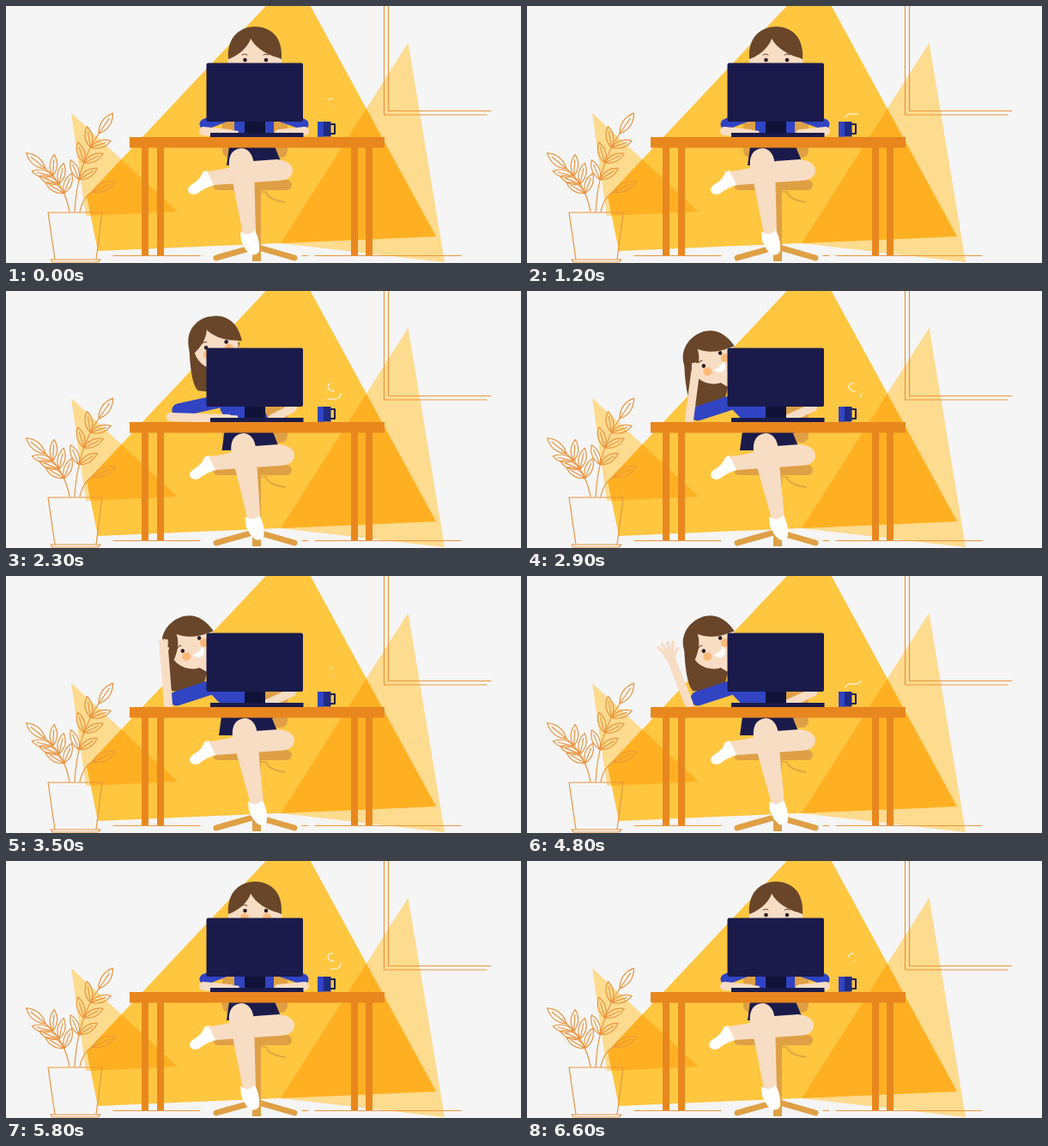
These frames come from a looping animation (600 by 300 pixels, 6.7 s). An HTML page:

```html
<!DOCTYPE html>
<html lang="en">
<head>
<meta charset="utf-8">
<title>Peek over the desk</title>
<style>
  html, body { margin: 0; width: 100%; height: 100%; overflow: hidden; background: #f5f5f6; }
  svg { display: block; width: 100vw; height: 100vh; }
  .line { fill: none; stroke: #e9963f; stroke-width: 1.2; stroke-linecap: round; stroke-linejoin: round; }
  .limb { fill: none; stroke-linecap: round; stroke-linejoin: round; }
  .skin { fill: #f8ddc5; }
  .skin.limb { fill: none; stroke: #f8ddc5; }
  .blue { fill: #3044c4; }
  .blue.limb { fill: none; stroke: #3044c4; }
  .hair { fill: #69462a; }
  .navy { fill: #1a1b4b; }
  .wood { fill: #e8871e; }
  .chair { fill: #dfa045; }
  .chair.limb { fill: none; stroke: #dfa045; }
  .steam { stroke: #fff2d5; stroke-width: 1.4; }
</style>
</head>
<body>
<svg viewBox="0 0 600 300">
  <defs>
    <path id="big" d="M328 -27L94 222L107 286L501 269L340 -27Z"/>
    <path id="small" d="M76 125L200 240L93 245Z"/>
    <path id="tall" d="M468.500 43L511 299L320 277Z"/>
    <clipPath id="inBig"><use href="#big"/></clipPath>
  </defs>

  <g id="backdrop">
    <g fill="#fddb8f"><use href="#small"/><use href="#tall"/></g>
    <use href="#big" fill="#ffc640"/>
    <g clip-path="url(#inBig)" fill="#ffb022"><use href="#small"/><use href="#tall"/></g>
    <path class="line" d="M440.500 0V127H560M445.500 0V122.500H565"/>
    <path class="line" d="M125 291.500H226M345 291.500H352M360 291.500H530"/>
  </g>

  <g id="plant" class="line">
    <path d="M49 241H112L105 296H57ZM52 296H110L107 299H54Z"/>
  </g>

  <g id="seat">
    <rect class="chair" x="252" y="118" width="76" height="59" rx="8"/>
    <path class="chair" d="M287 212H297V298H287Z"/>
    <path class="chair limb" stroke-width="7" d="M245 294L291 281L336 294"/>
    <path class="chair limb" stroke-width="1.500" d="M297 217H303Q305 226 325 229"/>
    <rect class="chair" x="241" y="203" width="92" height="12" rx="6"/>
  </g>

  <path id="backHair" class="hair"/>
  <path id="neck" class="skin limb" stroke-width="15"/>
  <path id="torso" class="blue"/>
  <path id="sleeveR" class="blue limb" stroke-width="13"/>
  <path id="armR" class="skin limb" stroke-width="10"/>

  <g id="legs">
    <path id="skirt" class="navy"/>
    <g id="foot">
      <path fill="#fff" d="M234 192L243 209Q231 212 223 219Q214 222 212 215Q212 210 220 206Q227 201 229 194Z"/>
      <path class="skin" d="M235 193Q262 190 288 181L316 179Q334 181 334 193Q332 204 315 204L242 209Z"/>
    </g>
    <path id="shin" class="skin"/>
    <path id="shoe" fill="#fff"/>
  </g>

  <g id="head">
    <circle id="earL" class="skin" cy="9" r="4.500"/>
    <circle id="earR" class="skin" cy="9" r="4.500"/>
    <ellipse class="skin" cy="4" rx="26" ry="28"/>
    <g id="face">
      <circle cx="-12" cy="16" r="5" fill="#fcb878"/>
      <circle cx="14" cy="16" r="5" fill="#fcb878"/>
      <circle cx="-11.500" cy="8" r="2.300" fill="#2b2024"/>
      <circle cx="13" cy="8" r="2.300" fill="#2b2024"/>
      <path class="limb" stroke="#69462a" stroke-width="1" d="M-15 2Q-12 0 -9 2M10 2Q13 0 16 2"/>
      <path fill="#fff" d="M-5 19Q3 22 10 18Q9 27 2 27Q-4 26 -5 19Z"/>
    </g>
    <path class="hair" d="M-31 7C-33 -20 -16 -31 0 -31C17 -31 33 -20 31 7L26 5C14 2 1 -6 -5 -17C-8 -7 -18 1 -26 5Z"/>
  </g>

  <path id="sleeveL" class="blue limb"/>
  <path id="armL" class="skin limb" stroke-width="10"/>
  <g id="hand">
    <ellipse class="skin" rx="7" ry="8"/>
    <path id="fingers" class="skin limb" stroke-width="3.800"/>
  </g>

  <g id="desk">
    <path class="wood" d="M158 160h8V291h-8ZM176 160h8V291h-8ZM402 160h8V291h-8ZM419 160h8V291h-8Z"/>
    <rect class="wood" x="144" y="153" width="297" height="12.500"/>
    <rect x="278" y="133" width="24" height="17" fill="#101238"/>
    <rect class="navy" x="238" y="148" width="108.500" height="5"/>
    <rect class="navy" x="233.500" y="66.500" width="112.500" height="68.500" rx="2"/>
    <path class="limb" stroke="#1a1b4b" stroke-width="2" d="M377 138H383V149H377"/>
    <rect fill="#1f2a80" x="363" y="135" width="15.500" height="17.500"/>
    <rect class="blue" x="363" y="135" width="7" height="17.500"/>
  </g>
  <path id="steamLow" class="limb steam" pathLength="100" d="M371 130Q372 125 380 126Q389 127 390 120"/>
  <path id="steamTop" class="limb steam" pathLength="100" d="M382 117Q375 116 375 112Q376 107 380 108"/>
</svg>

<script>
const LOOP = 6700, STEP = 100, STEAM = LOOP / 2;
const $ = id => document.getElementById(id);
const clamp = v => Math.max(0, Math.min(1, v));
const mix = (a, b, u) => a + (b - a) * u;
const ramp = (v, from, to) => clamp((v - from) / (to - from));
const ease = (t, from, to) => { const u = ramp(t, from, to); return u * u * (3 - 2 * u); };
const draw = (id, d) => $(id).setAttribute('d', d);
const place = (id, v) => $(id).setAttribute('transform', v);

const leaf = (x, y, turn, n) => `<path transform="translate(${x} ${y}) rotate(${turn})"
  d="M0 0Q${n * .5} ${-n * .34} ${n} 0Q${n * .5} ${n * .34} 0 0H${n * .75}"/>`;

// A curved stem with pairs of leaves and one at the tip
function stem(x0, y0, cx, cy, x1, y1, pairs) {
  let out = `<path d="M${x0} ${y0}Q${cx} ${cy} ${x1} ${y1}"/>`;
  for (let i = 1; i <= pairs + 1; i++) {
    const u = .15 + .85 * i / (pairs + 1), v = 1 - u;
    const x = v * v * x0 + 2 * u * v * cx + u * u * x1;
    const y = v * v * y0 + 2 * u * v * cy + u * u * y1;
    const turn = Math.atan2(mix(cy - y0, y1 - cy, u), mix(cx - x0, x1 - cx, u)) * 180 / Math.PI;
    out += i > pairs ? leaf(x, y, turn, 29) : leaf(x, y, turn - 36, 25) + leaf(x, y, turn + 45, 25);
  }
  return out;
}
$('plant').insertAdjacentHTML('beforeend',
  stem(80, 240, 83, 185, 108, 149, 3) +
  stem(74, 240, 68, 208, 46, 190, 3) +
  stem(86, 240, 90, 222, 101, 217, 0));

function drawHead(lean, lift) {
  const x = mix(290, 213, lean), y = 55 + 23 * lean ** 3;
  const ear = mix(27, 21, clamp(lean * 2));
  place('head', `translate(${x} ${y}) rotate(${-38 * lean ** 1.7})`);
  place('face', `translate(0 ${-5 * lift})`);
  $('earL').setAttribute('cx', -ear);
  $('earR').setAttribute('cx', ear);
  draw('backHair', `M${x - 30} ${y}q1 46 10 56l35 4L${x + 29} ${y}Z`);
  draw('neck', `M${x + lean * 12} ${y + 20}L${290 - 36 * lean} 115`);
}

function drawArms(t, lean) {
  const early = 1 - (1 - lean) ** 3, late = lean ** 3;
  const reach = ease(t, 2600, 3000) - ease(t, 5000, 5450);
  const wave = ease(t, 3550, 3850) - ease(t, 4900, 5100);
  const swing = 16 + 9 * Math.sin((t - 4780) / 600 * 2 * Math.PI);
  const tap = Math.sin(t / 75) * (1 - reach);

  const fx = mix(230, 189, early), fy = mix(146, 150, late);
  const px = mix(260, 184, reach) - wave * swing + tap, py = mix(149, 86, reach) + wave * 6;
  draw('sleeveL', `M${mix(255, 242, lean)} 129L${mix(232, 199, early)} ${mix(138, 143, late)}`);
  $('sleeveL').setAttribute('stroke-width', mix(13, 17, lean));
  draw('armL', `M${fx} ${fy}L${px} ${py}`);

  const aim = Math.atan2(py - fy, px - fx) * 180 / Math.PI + 90;
  const spread = mix(.25 * reach, 1, wave);
  place('hand', `translate(${px} ${py}) rotate(${aim}) scale(${.65 + .3 * spread})`);
  const fingers = [-1.5, -.5, .5, 1.5].map(k => {
    const a = k * .32 * spread, n = 13 - Math.abs(k);
    return `M${k * 3} -3l${Math.sin(a) * n} ${-Math.cos(a) * n}`;
  }).join('');
  draw('fingers', `${fingers}M4 3L${5 + 7 * spread} ${-1 - 3 * spread}`);

  const rx = mix(346, 331, early);
  draw('sleeveR', `M${318 - 18 * lean} 128L${rx} ${mix(138, 125, early)}`);
  draw('armR', `M${rx + 2} ${mix(146, 136, early)}L${318 - 14 * lean - tap} 149`);
  draw('torso', `M${266 - 30 * lean} ${102 + 18 * lean}L${312 - 42 * lean} 102L312 166
    H266L${266 - 27 * lean} ${140 - 2 * lean}Z`);
}

function drawLegs(t, lean) {
  const d = 9 * lean, k = 4 * lean;
  draw('skirt', `M${260 - d} 164H${313 - k}L${320 - k} 181L${290 - k} 186L${257 - d} 186Z`);
  place('foot', `translate(${2 * (ease(t, 0, 1200) - ease(t, 5800, 6700))} 0)`);
  draw('shin', `M${260 + k} 188Q${258 + k} 167 ${275 + k} 166Q${289 + k} 168 ${289 + k} 190
    L${291 + d} 266H${276 + d}L${264 + k} 205Z`);
  draw('shoe', `M${273 + d} 263q8 7 17 -1q6 11 5 24q-3 6 -10 4q-7 -5 -11 -16Z`);
}

function trim(id, tail, tip) {
  $(id).setAttribute('stroke-dasharray', `0 ${100 * tail} ${100 * Math.max(0, tip - tail)} 200`);
  $(id).setAttribute('opacity', tip > tail ? 1 : 0);
}

function render(time) {
  const t = Math.floor(time % LOOP / STEP) * STEP;
  const lean = ease(t, 1700, 2750) - ease(t, 5000, 5600);
  drawHead(lean, ease(t, 1700, 2300) - ease(t, 5900, 6300));
  drawArms(t, lean);
  drawLegs(t, lean);

  const p = (t / STEAM + .94) % 1;
  trim('steamLow', ramp(p, .55, .85), ramp(p, .1, .4));
  trim('steamTop', ramp(p, .8, 1), ramp(p, .4, .65));
}

function frame(now) {
  render(now);
  requestAnimationFrame(frame);
}
render(0);
requestAnimationFrame(frame);
</script>
</body>
</html>
```
